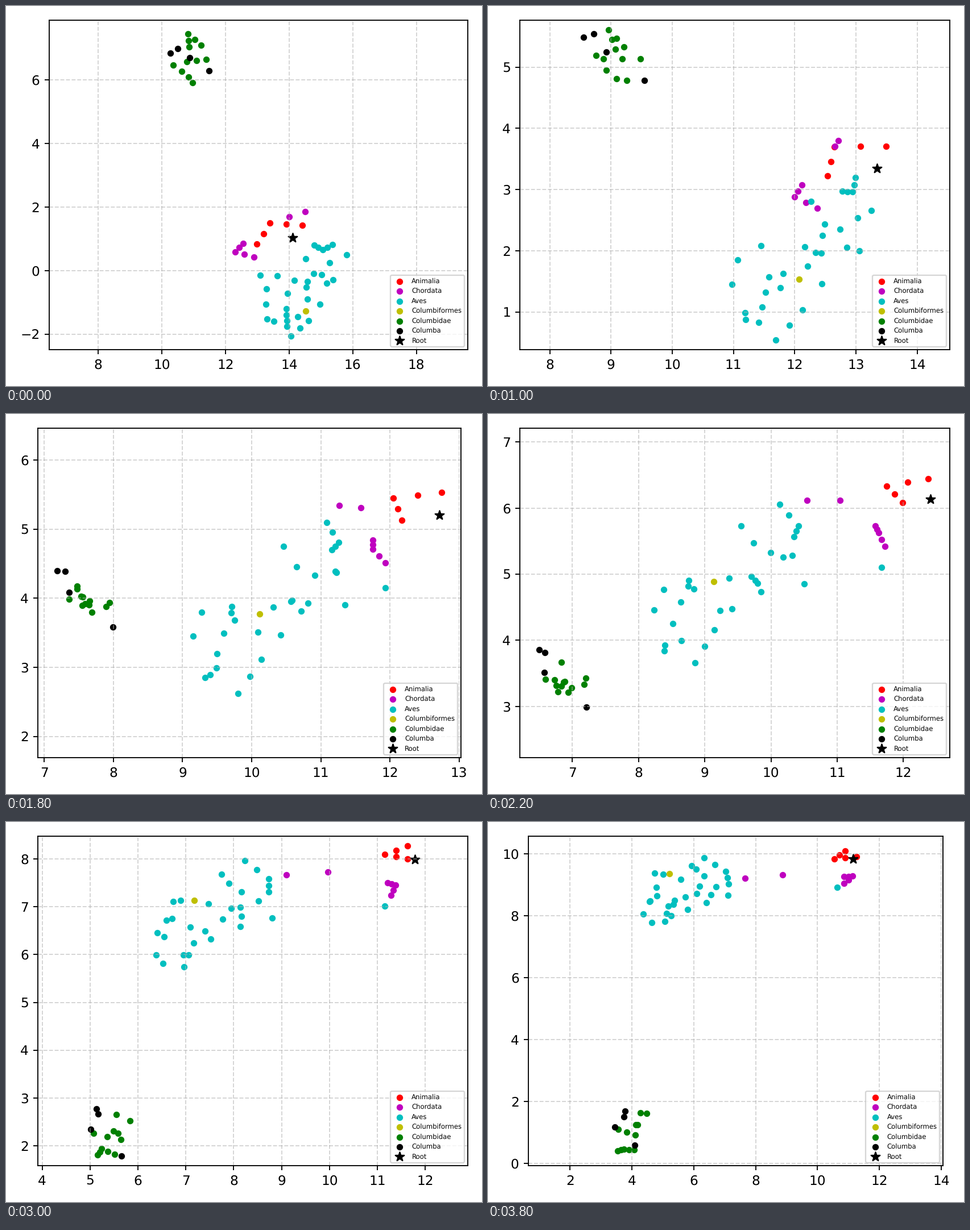
A matplotlib script that plays this animation: 837x669 px, repeating every 4000 ms.

```python
import numpy as np
import matplotlib.pyplot as plt
from matplotlib.animation import FuncAnimation

DPI = 167.25
FRAMES = 20
INTERVAL = 200
plt.rcParams["text.hinting"] = "no_hinting"  # keeps text sizes unrounded

groups = []


def curve(n, *keys):
    """Spread n dots evenly along a polyline through keys (x0, y0, x1, y1)."""
    keys = np.array(keys, float)
    u = np.linspace(0, len(keys) - 1, n)
    return np.column_stack([np.interp(u, range(len(keys)), k) for k in keys.T])


def group(label, color, *curves, marker="o", size=15):
    style = dict(label=label, c=color, marker=marker, s=size)
    groups.append((style, np.vstack(curves)))


group("Animalia", "r",
      curve(5, (12.99, .83, 11.26, 9.91), (13.4, 1.5, 10.55, 9.85),
            (14.42, 1.43, 10.89, 10.09)))
group("Chordata", "m",
      curve(5, (12.56, .86, 10.86, 9.27), (12.3, .59, 11.14, 9.29),
            (12.9, .43, 10.86, 9.05)),
      curve(2, (14.01, 1.7, 8.88, 9.33), (14.51, 1.86, 7.66, 9.22)))
group("Aves", "c",
      curve(1, (13.1, -.14, 10.63, 8.92)),
      curve(6, (14.06, -2.06, 5.07, 7.82), (14.75, -1.45, 5.2, 8.45),
            (15.81, .49, 6.09, 8.72)),
      curve(4, (13.93, -1.75, 4.37, 8.06), (13.92, -1.21, 5.01, 9.35)),
      curve(4, (13.63, -.16, 5.35, 8.37), (13.13, -.79, 4.54, 8.8),
            (13.53, -1.59, 4.65, 7.79)),
      curve(4, (13.3, -1.52, 5.26, 8), (14.28, -.32, 6.07, 8.31),
            (15.18, -.39, 7.1, 8.67)),
      curve(4, (14.27, -1.46, 4.73, 9.39), (14.73, -.63, 6, 9.09),
            (14.17, -.3, 6.56, 8.69)),
      curve(4, (14.53, .37, 5.93, 9.63), (14.9, -.32, 6.14, 9.46),
            (15.28, .25, 6.72, 8.95)),
      curve(5, (14.79, .8, 7.12, 9.04), (15.05, .65, 7.04, 9.43),
            (15.37, .81, 6.33, 9.87)))
group("Columbiformes", "y", curve(1, (14.52, -1.27, 5.22, 9.37)))
group("Columbidae", "g",
      curve(5, (10.86, 7.03, 4.08, .44), (10.82, 7.44, 3.75, .47),
            (11.24, 7.09, 3.54, .41)),
      curve(3, (11.4, 6.64, 4.11, .93), (10.78, 6.58, 3.55, 1.11)),
      curve(4, (10.36, 6.46, 4.27, 1.64), (10.77, 6.18, 4.05, 1.06),
            (10.97, 5.91, 4.47, 1.62)))
group("Columba", "k",
      curve(2, (10.26, 6.84, 3.77, 1.69), (10.5, 6.98, 3.74, 1.51)),
      curve(2, (10.88, 6.7, 3.45, 1.19), (11.49, 6.28, 4.1, .59)))
group("Root", "k", curve(1, (14.12, 1.03, 11.16, 9.84)), marker="*", size=50)

fig, ax = plt.subplots(figsize=(837 / DPI, 669 / DPI), dpi=DPI)


def update(i):
    t = i / (FRAMES - 1)
    ax.clear()
    # The layout is always worked out from the default margins.
    fig.subplots_adjust(left=.125, right=.9, bottom=.11, top=.88)
    for style, dots in groups:
        start, end = dots[:, :2], dots[:, 2:]
        ax.scatter(*(start + (end - start) * t).T, **style)
    ax.axis("equal")
    ax.grid(True, linestyle="--", alpha=.55)
    ax.legend(loc="lower right", fontsize=5)
    fig.tight_layout()
    return []


anim = FuncAnimation(fig, update, frames=FRAMES, interval=INTERVAL,
                     init_func=lambda: update(0), repeat=True, repeat_delay=0)
plt.show()
```
